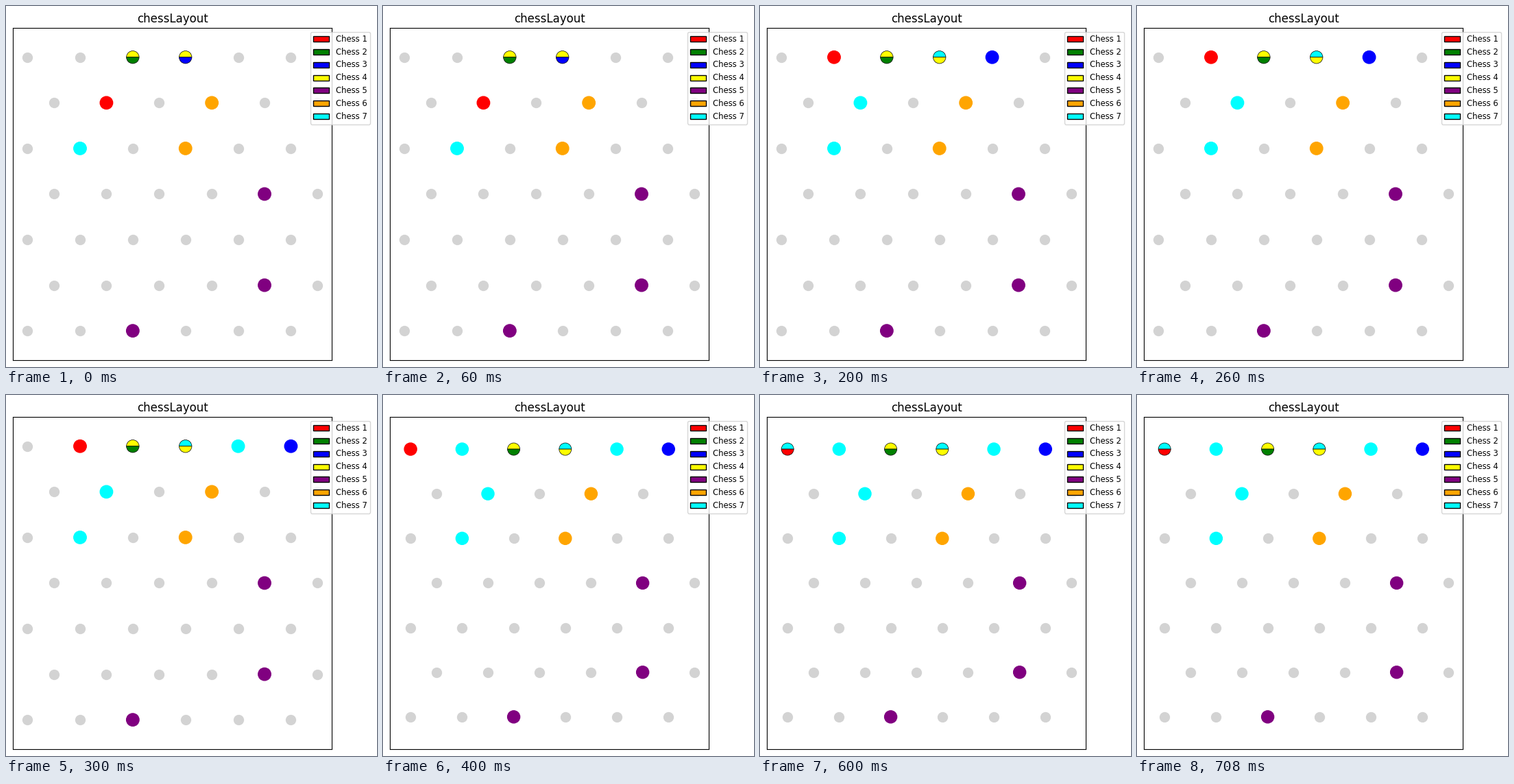
A matplotlib script for the animation above (780 ms loop, 541x527 px).

```python
import math

import matplotlib.pyplot as plt
from matplotlib.animation import FuncAnimation
from matplotlib.patches import Circle, Patch, Wedge

W, H, DPI = 541, 527, 100
AX_W, AX_H, PAD = 465, 485.1, 10
COLS, ROWS, RADIUS = 6, 7, 0.12
TICK, STEP, LOOP, LAST = 20, 100, 780, 6

NAMES = ["red", "green", "blue", "yellow", "purple", "orange", "cyan"]
COLORS = dict(enumerate(NAMES, start=1))


def position(col, row):
    return col + row % 2 / 2, (ROWS // 2 - row) * math.sqrt(3) / 2


def red_cell(step):
    """Climbs to the top row, then hops between its first two cells."""
    if step < 2:
        return 1, 1
    return (1 if step < 4 else step % 2), 0


def blue_cell(step):
    """Walks two cells to the right along the top row, every other step."""
    return 3 + min(step + 1, 4) // 2, 0


def vacated(walk, step):
    return {walk(s) for s in range(step) if walk(s) != walk(s + 1)}


def board_at(step):
    """Map each occupied cell to its pieces, the highest number on top."""
    layout = {
        1: {red_cell(step)},
        2: {(2, 0)},
        3: {blue_cell(step)},
        4: {(2, 0), (3, 0)},
        5: {(4, 3), (4, 5), (2, 6)},
        6: {(3, 1), (3, 2)},
        # cyan fills every cell that red or blue leaves behind
        7: {(1, 2)} | vacated(red_cell, step) | vacated(blue_cell, step),
    }
    board = {}
    for piece, cells in layout.items():
        for cell in cells:
            board.setdefault(cell, []).insert(0, piece)
    return board


def fit_view(board):
    """Equal-aspect limits with a 5% margin around dots and pieces."""
    left = min([0] + [position(*cell)[0] - RADIUS for cell in board])
    right = COLS - 0.5
    margin = 0.05 * (right - left)
    ax.set_xlim(left - margin, right + margin)
    half = (right - left + 2 * margin) * AX_H / AX_W / 2
    ax.set_ylim(-half, half)


def piece_patches(cell, pieces):
    center = position(*cell)
    if len(pieces) == 1:
        color = COLORS[pieces[0]]
        return [Circle(center, RADIUS, facecolor=color, edgecolor=color)]
    return [Wedge(center, RADIUS, a, a + 180, facecolor=COLORS[p],
                  edgecolor="black", linewidth=0.5)
            for p, a in zip(pieces, (0, 180))]


fig = plt.figure(figsize=(W / DPI, H / DPI), dpi=DPI, facecolor="white")
ax = fig.add_axes([PAD / W, PAD / H, AX_W / W, AX_H / H])
ax.set_xticks([])
ax.set_yticks([])
ax.set_title("chessLayout")
legend = ax.legend(
    handles=[Patch(facecolor=c, edgecolor="black", label=f"Chess {i}")
             for i, c in COLORS.items()],
    loc="upper left", bbox_to_anchor=(0.92, 1), fontsize="small")
for label in legend.get_texts():
    label.set_y(0.5)  # settle baselines on the pixel rows of the swatches

dots, = ax.plot([], [], "o", color="lightgray", markersize=10, zorder=0.5)
shown = []


def update(tick):
    board = board_at(min(tick * TICK // STEP, LAST))
    while shown:
        shown.pop().remove()
    fit_view(board)
    free = [position(c, r) for r in range(ROWS) for c in range(COLS)
            if (c, r) not in board]
    dots.set_data(*zip(*free))
    for cell, pieces in board.items():
        for patch in piece_patches(cell, pieces):
            shown.append(ax.add_patch(patch))
    return [dots, *shown]


anim = FuncAnimation(fig, update, frames=LOOP // TICK, interval=TICK,
                     repeat=True, repeat_delay=0, blit=False)
plt.show()
```
